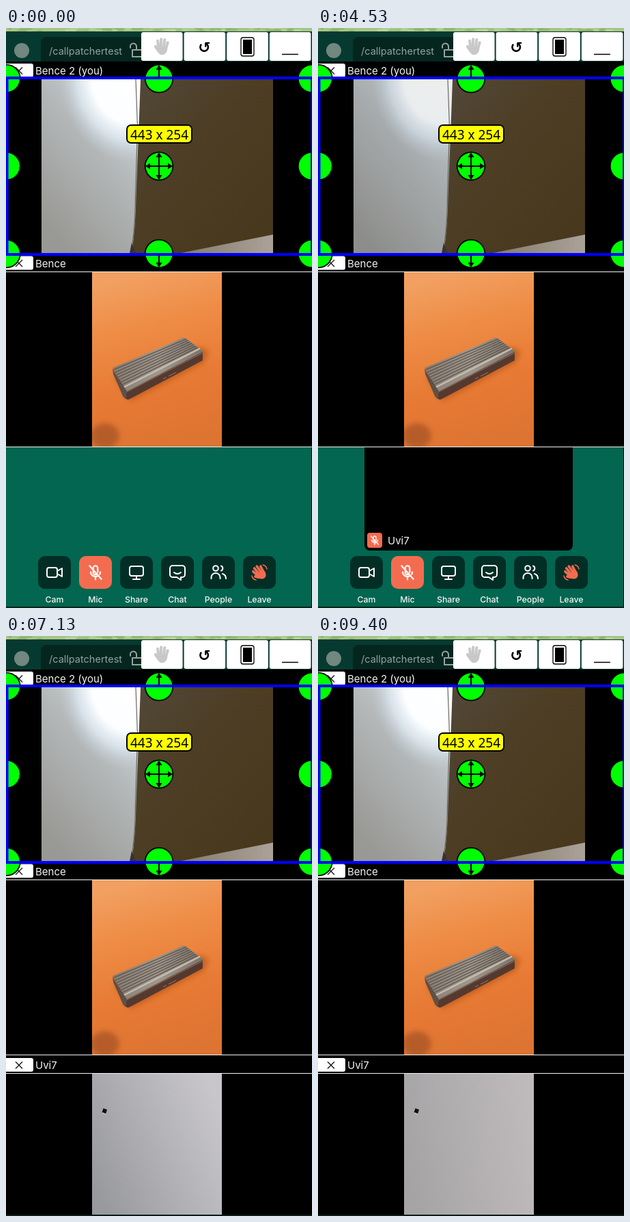
Recreate the animation shown at these times as an HTML page. Size 448 by 848 pixels, loop 9.54 s.

```html
<!DOCTYPE html>
<html lang="en">
<head>
<meta charset="utf-8">
<title>Video call</title>
<style>
  html, body { margin: 0; width: 448px; height: 848px; overflow: hidden; background: #000; }
  svg { display: block; }
  text { font-family: Inter, "Open Sans", sans-serif; fill: #f4f4f4; }
  .name { font-size: 15px; }
  .label { font-size: 12.3px; font-weight: 500; text-anchor: middle; }
  .size { font: 19px "Noto Sans", sans-serif; fill: #000; text-anchor: middle; }
  .icon { fill: none; stroke: #fff; stroke-width: 2; stroke-linecap: round; stroke-linejoin: round; }
  .bar, .joined, .tile, .dim, .warm { animation: 9540ms linear infinite; }
  .bar { animation-name: bar; }
  .joined { animation-name: joined; }
  .tile { animation-name: tile; }
  .dim { animation-name: dim; }
  .warm { animation-name: warm; }
  @keyframes bar { 0%, 64.98% { visibility: visible; } 64.99%, 100% { visibility: hidden; } }
  @keyframes joined { 0%, 64.98% { visibility: hidden; } 64.99%, 100% { visibility: visible; } }
  @keyframes tile {
    0%, 38% { opacity: 0; transform: translateY(55px); animation-timing-function: ease-out; }
    42.5%, 100% { opacity: 1; transform: none; }
  }
  @keyframes dim { 0%, 100% { opacity: 0; } 19% { opacity: .04; } 31% { opacity: .09; } 48% { opacity: .07; } 66% { opacity: 0; } }
  @keyframes warm { 0%, 83% { opacity: 0; } 95%, 100% { opacity: 1; } }
</style>
</head>
<body>
<svg width="448" height="848" viewBox="0 0 448 848">
  <defs>
    <linearGradient id="wall" x1=".9" y1="0" x2=".25" y2="1">
      <stop offset="0" stop-color="#d5dde3"/>
      <stop offset=".45" stop-color="#b3b7b8"/>
      <stop offset="1" stop-color="#989894"/>
    </linearGradient>
    <radialGradient id="lamp" gradientUnits="userSpaceOnUse" cx="0" cy="0" r="1" gradientTransform="translate(182 68) scale(104 128)">
      <stop offset="0" stop-color="#fff"/>
      <stop offset=".55" stop-color="#fcfeff"/>
      <stop offset=".75" stop-color="#e0ebf3" stop-opacity=".8"/>
      <stop offset="1" stop-color="#c3d0da" stop-opacity="0"/>
    </radialGradient>
    <linearGradient id="curtain" x1="0" y1="0" x2="1" y2="1">
      <stop offset="0" stop-color="#52483a"/>
      <stop offset=".4" stop-color="#4d3e25"/>
      <stop offset="1" stop-color="#47371b"/>
    </linearGradient>
    <linearGradient id="floor">
      <stop offset="0" stop-color="#857b6c"/>
      <stop offset="1" stop-color="#aaa299"/>
    </linearGradient>
    <linearGradient id="cloth" x1=".4" y1="0" x2=".6" y2="1">
      <stop offset="0" stop-color="#f2a062"/>
      <stop offset=".3" stop-color="#ee8c45"/>
      <stop offset=".65" stop-color="#e77a34"/>
      <stop offset="1" stop-color="#dd7432"/>
    </linearGradient>
    <linearGradient id="metal">
      <stop offset="0" stop-color="#857c73"/>
      <stop offset=".5" stop-color="#a0978c"/>
      <stop offset="1" stop-color="#7d736a"/>
    </linearGradient>
    <linearGradient id="ceiling" x1="0" y1=".75" x2="1" y2=".25">
      <stop offset="0" stop-color="#999a9e"/>
      <stop offset=".45" stop-color="#afafb3"/>
      <stop offset="1" stop-color="#c8c6cb"/>
    </linearGradient>
    <linearGradient id="glow" x1="0" y1="0" x2="1" y2="1">
      <stop offset="0" stop-color="#a8a5a4" stop-opacity=".5"/>
      <stop offset="1" stop-color="#bfb6b4" stop-opacity=".5"/>
    </linearGradient>
    <filter id="soft" x="-50%" y="-50%" width="200%" height="200%"><feGaussianBlur stdDeviation="3.500"/></filter>
    <clipPath id="view1"><path d="M52 75H391V329H52z"/></clipPath>
    <clipPath id="view2"><path d="M126 357H316V612H126z"/></clipPath>
    <clipPath id="strip"><path d="M0 0H448V5H0z"/></clipPath>
    <symbol id="mic" viewBox="0 0 24 24">
      <path class="icon" d="M9 7V6a3 3 0 0 1 6 0v6M9 9v3a3 3 0 0 0 4.500 2.500M5.500 11.500a6.500 6.500 0 0 0 10 5M18.500 11.500a6.500 6.500 0 0 1-.8 3M12 18v3.500M4 3l16 18"/>
    </symbol>
    <g id="hand" fill="none" stroke="currentColor" stroke-width="4.2" stroke-linecap="round">
      <path d="M-6 0L-7.500-8M-2 0L-2.500-11M2.500 0L3-11M6.500 1L8-7M-7 5L-10 1"/>
      <path d="M-8 0H8.500V5Q7 13 0 13Q-5 12-9 5z" fill="currentColor" stroke="none"/>
    </g>
    <g id="close">
      <path d="M0 0H37a3 3 0 0 1 3 3V17a3 3 0 0 1-3 3H0z" fill="#fff"/>
      <path d="M14 5.500l10 10m0-10l-10 10" stroke="#111" stroke-width="1.3"/>
    </g>
    <g id="arrow">
      <path d="M0 0V-15" stroke="#000" stroke-width="2"/>
      <path d="M-4.500-13L0-20L4.500-13z"/>
    </g>
  </defs>

  <!-- Header -->
  <path d="M0 0H448V50H0z" fill="#063a30"/>
  <g id="leaves" clip-path="url(#strip)"><path d="M0 0H448V5H0z" fill="#a6c586"/></g>
  <path d="M51 49V21a8 8 0 0 1 8-8H240V49z" fill="#04261f"/>
  <circle cx="23" cy="33" r="11" fill="#71877f"/>
  <text x="63" y="39" font-size="14.5" style="fill:#93a39e">/callpatchertest</text>
  <path d="M185 32h14v10h-14zM182 29v-2a4.500 4.500 0 0 1 9 0v5" class="icon" style="stroke:#93a39e"/>
  <path d="M0 49H448V848H0z"/>

  <!-- Call controls -->
  <g class="bar">
    <path d="M0 613H447V846H0z" fill="#026650"/>
    <path d="M0 846H448V848H0z" fill="#06241d"/>
    <g class="tile">
      <path d="M68 606H373V756a8 8 0 0 1-8 8H76a8 8 0 0 1-8-8z"/>
      <rect x="72" y="738" width="22" height="22" rx="4" fill="#f46c50"/>
      <use href="#mic" x="75" y="741" width="16" height="16"/>
      <text class="name" x="102" y="755">Uvi7</text>
    </g>
    <g id="buttons"></g>
    <g class="icon">
      <rect x="60" y="789" width="15" height="14" rx="3"/>
      <path d="M75 794l7-4v12l-7-4z"/>
      <rect x="181" y="787" width="20" height="14" rx="3"/>
      <path d="M186 806h10M191 802v3"/>
      <path d="M244 786h14a4 4 0 0 1 4 4v9a4 4 0 0 1-4 4h-2v4l-6-4h-6a4 4 0 0 1-4-4v-9a4 4 0 0 1 4-4zM246 796q5 4 10 0"/>
      <circle cx="307" cy="790" r="3.800"/>
      <path d="M300.500 805v-2a6.500 6 0 0 1 13 0v2M315 786.500a3.800 3.800 0 0 1 0 7M317 798q5 1.500 5 7"/>
    </g>
    <use href="#mic" x="118" y="783" width="26" height="26"/>
    <use href="#hand" transform="translate(371 796) rotate(-38) scale(.85)" color="#f46c50"/>
    <path d="M360 801q1 5 6 6M376 785q5 1 6 6" class="icon" style="stroke:#f46c50;stroke-width:1.5"/>
  </g>

  <!-- First view -->
  <use href="#close" y="52"/>
  <text class="name" x="43" y="68">Bence 2 (you)</text>
  <g clip-path="url(#view1)">
    <path d="M52 75H200V329H52z" fill="url(#wall)"/>
    <path d="M52 75H200V329H52z" fill="url(#lamp)"/>
    <path class="dim" d="M52 75H200V329H52z" fill="#111a26"/>
    <path d="M197 75H391V329H184Q190 290 190.500 245L195 130z" fill="url(#curtain)"/>
    <path d="M190 75L192.500 145L189.500 245Q189 295 183 329" fill="none" stroke="#6b6860" stroke-width="1.200"/>
    <path d="M181 329l3-15 6 15z" fill="#39332b"/>
    <path d="M256 329L391 302V329z" fill="url(#floor)"/>
  </g>

  <!-- Second view -->
  <use href="#close" y="333.500"/>
  <text class="name" x="43" y="350">Bence</text>
  <path d="M0 356.500H448M0 612.500H448" stroke="#f2f2f2"/>
  <g clip-path="url(#view2)">
    <path d="M126 357H316V612H126z" fill="url(#cloth)"/>
    <ellipse cx="145" cy="596" rx="21" ry="18" fill="#ac5626" opacity=".8" filter="url(#soft)"/>
    <path d="M158 510L182 546L290 490L297 473L285 466z" fill="#a9490f" opacity=".5" filter="url(#soft)"/>
    <path d="M156 498L177 531L178 543Q174 543 171 538L157 506z" fill="#5f5047"/>
    <path d="M177 531L288 473V486L180 543Q177 544 176 541z" fill="#56392e"/>
    <path d="M156 497L259 453Q262 452 265 455L289 473L177 531z" fill="url(#metal)"/>
    <g id="ridges" stroke="#5d554d" stroke-width="1.300"></g>
    <path d="M173 525L284 468.500" stroke="#c4bcb1" stroke-width="2.500"/>
    <path d="M177 532L288 475" stroke="#857669"/>
    <path d="M230 513l5-2.500M238 509l11-5.500" stroke="#8a7166" stroke-width="1.200"/>
  </g>

  <!-- Third view -->
  <g class="joined">
    <path d="M0 613H448V848H0z"/>
    <path d="M0 846H448V848H0z" fill="#0a1d19"/>
    <use href="#close" y="617"/>
    <text class="name" x="43" y="633">Uvi7</text>
    <path d="M0 639.500H448" stroke="#f2f2f2"/>
    <path d="M126 640H316V846H126z" fill="url(#ceiling)"/>
    <path class="warm" d="M126 640H316V846H126z" fill="url(#glow)"/>
    <path d="M142.500 690.500l5.500 2-2 6-5.500-2z" fill="#111"/>
    <path d="M141 697l5 2" stroke="#d8d8dc"/>
  </g>

  <!-- Resize frame -->
  <g id="grips" fill="#0f0" stroke="#000" stroke-width="1.800"></g>
  <use href="#arrow" x="224" y="74"/>
  <use href="#arrow" transform="translate(224 330) rotate(180)"/>
  <g id="cross"></g>
  <path d="M0 71H448V75H0zM0 329H448V333H0zM0 71H3.500V333H0zM446 71H448V333H446z" fill="#00f"/>
  <rect x="177" y="142" width="95" height="26" rx="6" fill="#ff0" stroke="#000" stroke-width="2"/>
  <text class="size" x="224.500" y="162.500">443 x 254</text>

  <!-- Toolbar -->
  <g id="tools" fill="#fff"></g>
  <use href="#hand" transform="translate(228.500 27) rotate(6) scale(.95)" color="#c8c8c8"/>
  <text x="290.500" y="36" text-anchor="middle" style="font:bold 22px 'DejaVu Sans',sans-serif;fill:#000">↺</text>
  <rect x="344" y="14" width="19" height="27" rx="3" fill="#fff" stroke="#000" stroke-width="1.300"/>
  <rect x="347" y="17" width="13" height="21"/>
  <path d="M404 38.500h24" stroke="#000" stroke-width="1.500"/>
</svg>
<script>
  const fill = (id, html) => document.getElementById(id).insertAdjacentHTML('beforeend', html);
  const list = (n, fn) => Array.from({ length: n }, (_, i) => fn(i)).join('');

  let seed = 7;
  const rand = () => (seed = seed * 16807 % 2147483647) / 2147483647;
  fill('leaves', list(60, i =>
    `<ellipse cx="${rand() * 448}" cy="${rand() * 5}" rx="${3 + rand() * 7}" ry="2" fill="${i % 2 ? '#c3d8a8' : '#84ab62'}" opacity=".5"/>`));

  fill('buttons', ['Cam', 'Mic', 'Share', 'Chat', 'People', 'Leave'].map((label, i) => {
    const x = 47 + i * 60;
    return `<rect x="${x}" y="772" width="48" height="48" rx="10" fill="${label === 'Mic' ? '#f46c50' : '#032e26'}"/>
      <text class="label" x="${x + 24}" y="840">${label}</text>`;
  }).join(''));

  fill('ridges', list(7, i => {
    const k = .08 + i * .105;
    return `<path d="M${156 + 21 * k} ${497 + 34 * k}L${262 + 26 * k} ${453 + 20 * k}"/>`;
  }));

  fill('grips', [0.5, 224, 448].map(x => [74, 202, 330].map(y =>
    `<circle cx="${x}" cy="${y}" r="20.300"/>`).join('')).join(''));

  fill('cross', list(4, i => `<use href="#arrow" transform="translate(224 202) rotate(${i * 90})"/>`));

  fill('tools', list(4, i =>
    `<rect x="${198 + i * 62.6}" y="6" width="60.600" height="42" rx="3"/>`));
</script>
</body>
</html>
```
